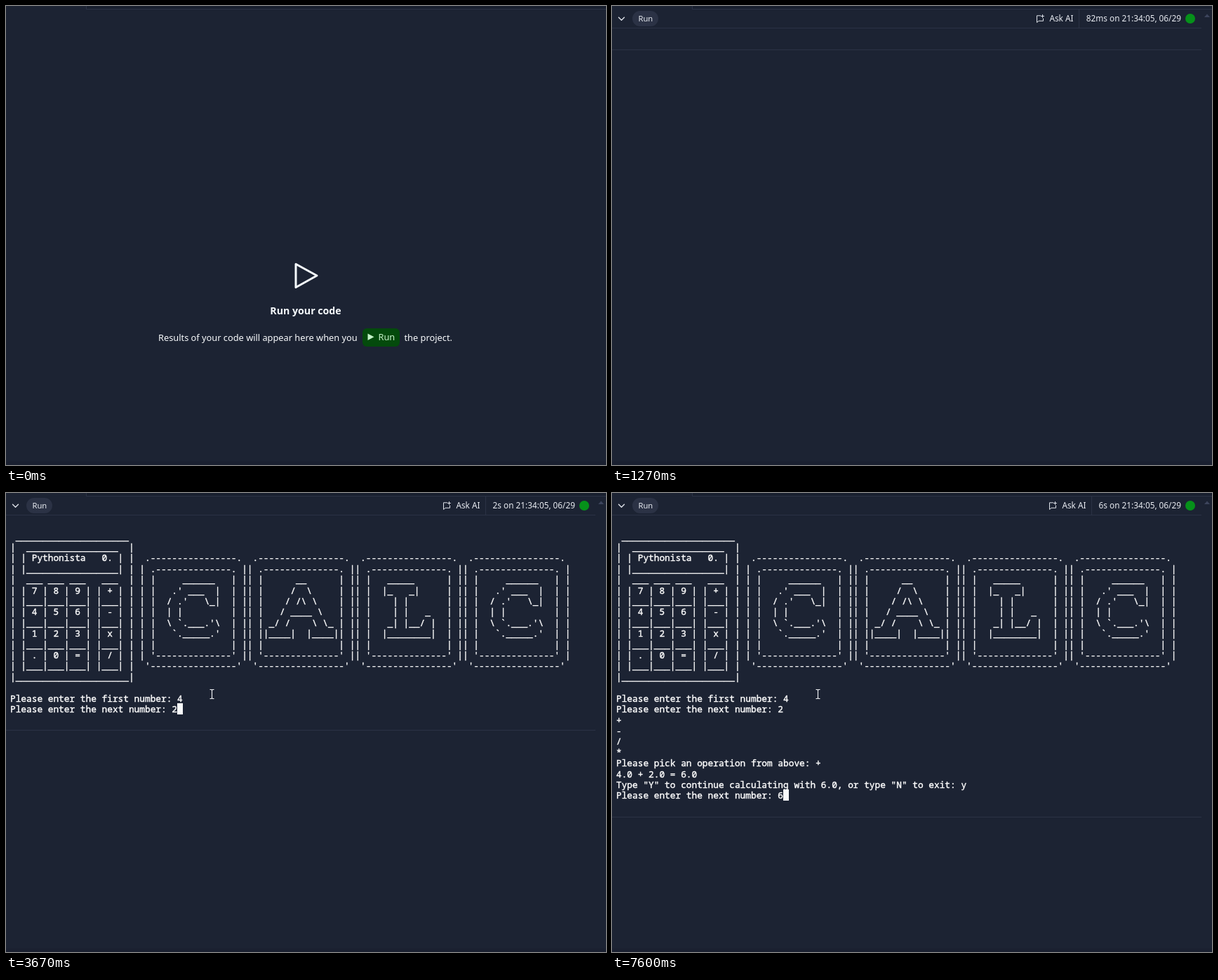
Recreate the animation shown at these times as an HTML page. Size 855 by 655 pixels, loop 8000 ms.

```html
<!DOCTYPE html>
<html lang="en">
<head>
<meta charset="utf-8">
<title>Console calculator</title>
<style>
  html, body { margin: 0; width: 100%; height: 100%; overflow: hidden; background: #1c2333; }
  svg, pre { position: absolute; left: 0; top: 0; }
  svg { width: 855px; height: 655px; }
  text { font: 11.8px "Noto Sans", sans-serif; fill: #e8ebf1; }
  .body { font-size: 12.8px; fill: #f8fafc; }
  .title { font-size: 14.2px; font-weight: 600; fill: #f5f9fc; }
  .rule { fill: #2b3245; }
  .line { fill: none; stroke: #dfe3ea; stroke-linecap: round; stroke-linejoin: round; }
  pre {
    margin: 0; left: 6px; top: 54.6px; color: #fff;
    font: 12.8px/15.4px "Noto Sans Mono", monospace;
    font-variant-ligatures: none;
    -webkit-text-stroke: 0.4px #fff;
  }
  #caret {
    display: inline-block; width: 8.3px; height: 16px; margin: -1px 0;
    vertical-align: top; background: #f8fafc;
  }
</style>
</head>
<body>
<svg viewBox="0 0 855 655">
  <rect width="855" height="655" fill="#1c2333"/>
  <rect x="115" width="740" height="4" fill="#181f2e"/>
  <path class="rule" d="M114 0h1v4h740v1H114z"/>
  <rect y="650" width="855" height="5" fill="#1a2030"/>

  <g id="intro">
    <path d="M413 368.2 443 384.7 413 401.5z" fill="none" stroke="#f5f9fc" stroke-width="3" stroke-linejoin="round"/>
    <text class="title" x="427" y="439.5" text-anchor="middle">Run your code</text>
    <text class="body" x="217" y="478">Results of your code will appear here when you</text>
    <rect x="508" y="460" width="53" height="26" rx="6" fill="#044a0c"/>
    <path d="M515.5 467.5 524.5 472.3 515.5 477z" fill="#c4f2c8"/>
    <text class="body" x="530.5" y="477" style="fill:#c4f2c8">Run</text>
    <text class="body" x="567.5" y="478">the project.</text>
  </g>

  <g id="panel">
    <path class="line" d="M9.5 16.3 13.5 20.3 17.5 16.3" stroke-width="1.4"/>
    <rect x="29" y="7" width="37" height="22" rx="11" fill="#2b3245"/>
    <text x="37.5" y="22" style="font-size:11.2px">Run</text>
    <rect class="rule" y="31" width="840" height="1"/>
    <rect class="rule" id="foot" width="840" height="1"/>
    <g id="ask">
      <path class="line" d="M-65.500 13.800H-70.500V23.500L-67.900 21.300H-61.500V18M-62.500 12.500V16.500M-64.500 14.500H-60.500" stroke-width="1"/>
      <text x="-18.500" y="22" text-anchor="end">Ask AI</text>
      <rect class="rule" x="-11" y="5" width="1" height="26"/>
    </g>
    <text id="clock" x="811" y="22" text-anchor="end"></text>
    <circle cx="824" cy="18" r="7" fill="#06911a"/>
    <path d="M844 16 848 11.500 852 16z" fill="#3c445c"/>
  </g>
</svg>

<pre id="term"><span id="art"> _____________________
|  _________________  |
| | Pythonista   0. | |  .----------------.  .----------------.  .----------------.  .----------------.
| |_________________| | | .--------------. || .--------------. || .--------------. || .--------------. |
|  ___ ___ ___   ___  | | |     ______   | || |      __      | || |   _____      | || |     ______   | |
| | 7 | 8 | 9 | | + | | | |   .' ___  |  | || |     /  \     | || |  |_   _|     | || |   .' ___  |  | |
| |___|___|___| |___| | | |  / .'   \_|  | || |    / /\ \    | || |    | |       | || |  / .'   \_|  | |
| | 4 | 5 | 6 | | - | | | |  | |         | || |   / ____ \   | || |    | |   _   | || |  | |         | |
| |___|___|___| |___| | | |  \ `.___.'\  | || | _/ /    \ \_ | || |   _| |__/ |  | || |  \ `.___.'\  | |
| | 1 | 2 | 3 | | x | | | |   `._____.'  | || ||____|  |____|| || |  |________|  | || |   `._____.'  | |
| |___|___|___| |___| | | |              | || |              | || |              | || |              | |
| | . | 0 | = | | / | | | '--------------' || '--------------' || '--------------' || '--------------' |
| |___|___|___| |___| |  '----------------'  '----------------'  '----------------'  '----------------'
|_____________________|

</span><span id="log"></span><span id="caret"></span></pre>

<svg viewBox="0 0 855 655">
  <path id="mouse" d="M-3 -6.500H-1L0 -5.500 1 -6.500H3M0 -5.500V5.500M-3 6.500H-1L0 5.500 1 6.500H3" fill="none" stroke="#f4f6f9" stroke-width="1.1"/>
</svg>

<script>
const LOOP = 8000, TICK = 200 / 3, ROW = 15.4;
const INTRO_END = 800, PANEL = 1067, START = 1200, PRINT = 1400, POINT = 1667;

// Console output: when each piece is appended
const output = [
  [PRINT, 'Please enter the first number: '],
  [2800, '4'],
  [3000, '\nPlease enter the next number: '],
  [3667, '2'],
  [3730, '\n+\n-\n/\n*\nPlease pick an operation from above: '],
  [4730, '+'],
  [5000, '\n4.0 + 2.0 = 6.0\nType "Y" to continue calculating with 6.0, or type "N" to exit: '],
  [6400, 'y'],
  [6467, '\nPlease enter the next number: '],
  [7600, '6']
];
// Pointer path: time, x, y
const path = [[POINT, 46, 315], [1733, 190, 292], [1800, 282, 284], [1867, 293, 287]];

const el = {};
for (const n of document.querySelectorAll('[id]')) el[n.id] = n;
const show = (node, on) => { node.style.display = on ? '' : 'none'; };
const put = (node, s) => { if (node.textContent !== s) node.textContent = s; };
const move = (node, x, y) => node.setAttribute('transform', `translate(${x} ${y})`);

function elapsed(t) {
  if (t >= 2130) return Math.floor((t - 1130) / 1000) + 's';
  const step = Math.floor((t - START) / TICK + 0.01);
  if (step <= 0) return '2ms';
  const ms = step <= 9 ? 2 + 717 * step / 9 : 719 + 62 * (step - 9);
  return Math.min(999, Math.round(ms)) + 'ms';
}

function pointer(t) {
  let i = path.length - 1;
  while (i > 0 && path[i][0] > t) i--;
  const a = path[i], b = path[i + 1] || a;
  const k = b === a ? 0 : (t - a[0]) / (b[0] - a[0]);
  return [a[1] + (b[1] - a[1]) * k, a[2] + (b[2] - a[2]) * k];
}

function draw(t) {
  show(el.intro, t < INTRO_END);
  show(el.panel, t >= PANEL);
  show(el.term, t >= PRINT);
  show(el.mouse, t >= POINT);

  const log = output.filter(o => t >= o[0]).map(o => o[1]).join('');
  put(el.log, log);
  const foot = log ? 323 + Math.round(ROW * (log.split('\n').length - 1)) : 62;
  el.foot.setAttribute('y', foot);

  if (t >= PANEL) {
    put(el.clock, elapsed(t) + ' on 21:34:05, 06/29');
    move(el.ask, Math.round(811 - el.clock.getComputedTextLength()), 0);
  }
  const [x, y] = pointer(t);
  move(el.mouse, Math.round(x) + 0.5, Math.round(y));
}

const t0 = performance.now();
function frame() {
  draw((performance.now() - t0) % LOOP);
  requestAnimationFrame(frame);
}
frame();
</script>
</body>
</html>
```
